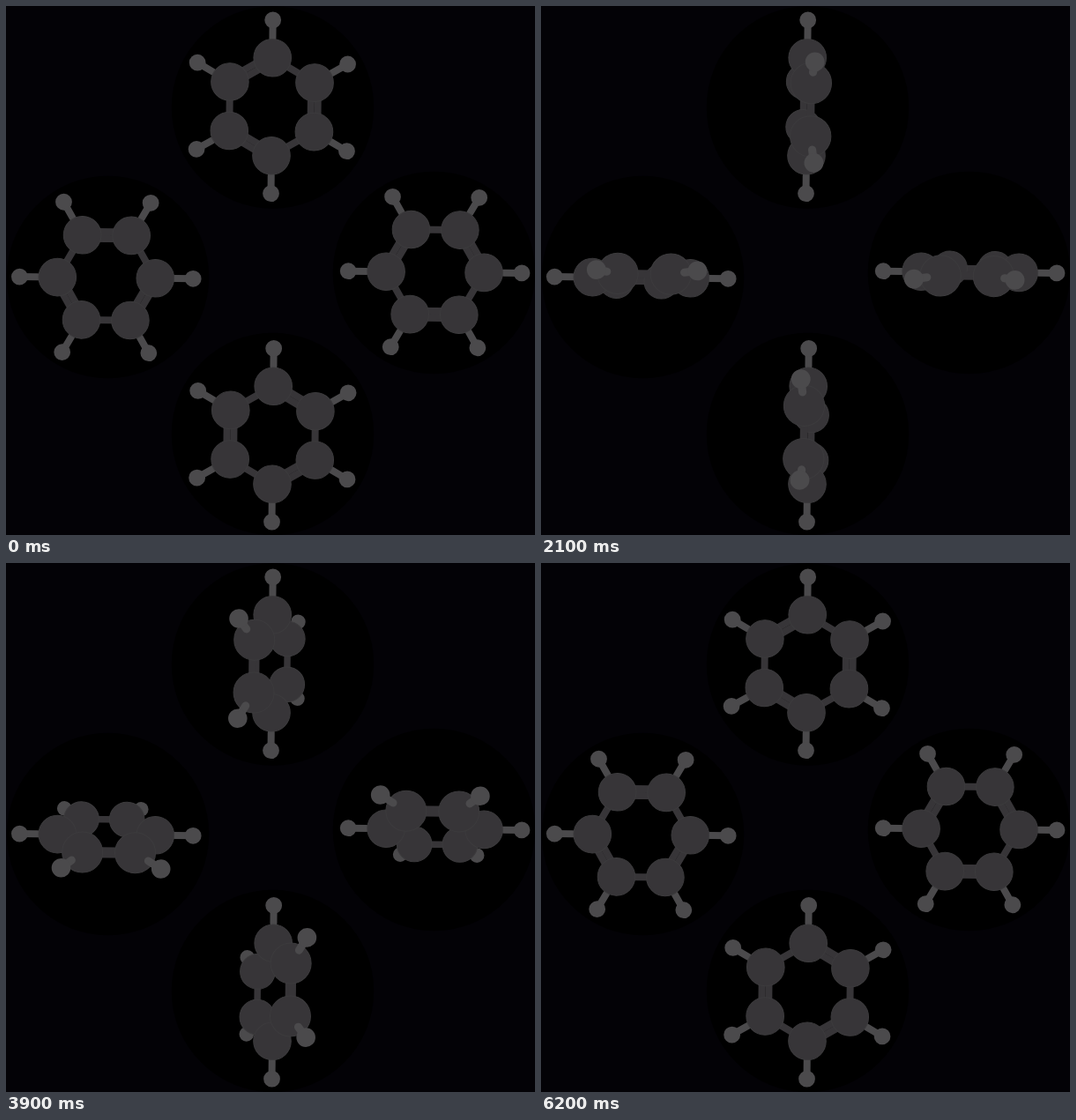
An HTML page with a canvas that plays this animation: 600x600 px, repeating every 6300 ms.

```html
<!DOCTYPE html>
<html lang="en">
<head>
<meta charset="utf-8">
<title>Turning rings</title>
<style>
  html, body { margin: 0; height: 100%; overflow: hidden; background: #030206; }
  canvas { display: block; width: 600px; height: 600px; }
</style>
</head>
<body>
<canvas id="stage" width="600" height="600"></canvas>
<script>
const ctx = document.getElementById('stage').getContext('2d');
const LOOP = 6300, STEP = 100, STEPS = 62;
const DEPTH = 600, HORIZON = -38, TILT = 0.011;
const CARBON = '#373538', RIM = '#3c3b3d', HYDROGEN = '#4b4a4c';

// Disc centre, ring centre and number of quarter turns
const rings = [
  { disc: [302.5, 115], at: [301.6, 114.3], turn: 0 },
  { disc: [485.5, 302.5], at: [486.6, 301.8], turn: 1 },
  { disc: [302.5, 485.5], at: [302.6, 486.8], turn: 2 },
  { disc: [115.5, 307.5], at: [113.8, 308.2], turn: 3 }
];

// Turns a flat point about the upright axis and projects it
function project([x, y], angle) {
  const z = -x * Math.sin(angle);
  const scale = DEPTH / (DEPTH - z);
  return { x: x * Math.cos(angle) * scale, y: HORIZON + (y - HORIZON) * scale, z, scale };
}

function polar(radius, i) {
  const a = i * Math.PI / 3;
  return [radius * Math.sin(a), -radius * Math.cos(a)];
}

function ball(p, radius, fill) {
  ctx.fillStyle = fill;
  ctx.beginPath();
  ctx.arc(p.x, p.y, radius * p.scale, 0, 2 * Math.PI);
  ctx.fill();
}

function rod(a, b, color) {
  ctx.strokeStyle = color;
  ctx.lineWidth = 4 * (a.scale + b.scale);
  ctx.beginPath();
  ctx.moveTo(a.x, a.y);
  ctx.lineTo(b.x, b.y);
  ctx.stroke();
}

function carbon(p) {
  ball(p, 21.3, CARBON);
  ctx.strokeStyle = RIM;
  ctx.lineWidth = 1;
  ctx.stroke();
}

function drawRing(angle) {
  const parts = [];
  for (let i = 0; i < 6; i++) {
    const from = polar(55.5, i), to = polar(55.5, i + 1);
    const c = project(from, angle), next = project(to, angle);
    parts.push({ z: c.z, draw: () => carbon(c) });

    // Odd sides are double bonds: two rods side by side in the plane
    const mid = polar(1, i + 0.5);
    const offsets = i % 2 ? [-3.9, 3.9] : [0];
    parts.push({
      z: Math.min(c.z, next.z) - 2,
      draw: () => offsets.forEach(d => {
        const shift = ([x, y]) => project([x + mid[0] * d, y + mid[1] * d], angle);
        rod(shift(from), shift(to), CARBON);
      })
    });

    const root = project(polar(78, i), angle), tip = project(polar(98.4, i), angle);
    parts.push({
      z: c.z + (c.z > 8 ? 1 : -1),
      draw: () => {
        rod(root, tip, HYDROGEN);
        ball(tip, 9.4, HYDROGEN);
      }
    });
  }
  parts.sort((a, b) => a.z - b.z).forEach(part => part.draw());
}

function frame(now) {
  const p = Math.floor(now % LOOP / STEP) / STEPS;
  const angle = (p * p * (3 - 2 * p) * 360 - 1) * Math.PI / 180;
  ctx.fillStyle = '#030206';
  ctx.fillRect(0, 0, 600, 600);
  ctx.lineCap = 'round';
  // Bonds 1, 3, 5 sit right, lower left and upper left
  for (const { disc, at, turn } of rings) {
    ball({ x: disc[0], y: disc[1], scale: 1 }, 114.7, '#000');
    ctx.save();
    ctx.translate(...at);
    ctx.rotate(turn * Math.PI / 2 + TILT);
    drawRing(angle);
    ctx.restore();
  }
}

const start = performance.now();
function tick() {
  frame(performance.now() - start);
  requestAnimationFrame(tick);
}
tick();
</script>
</body>
</html>
```
